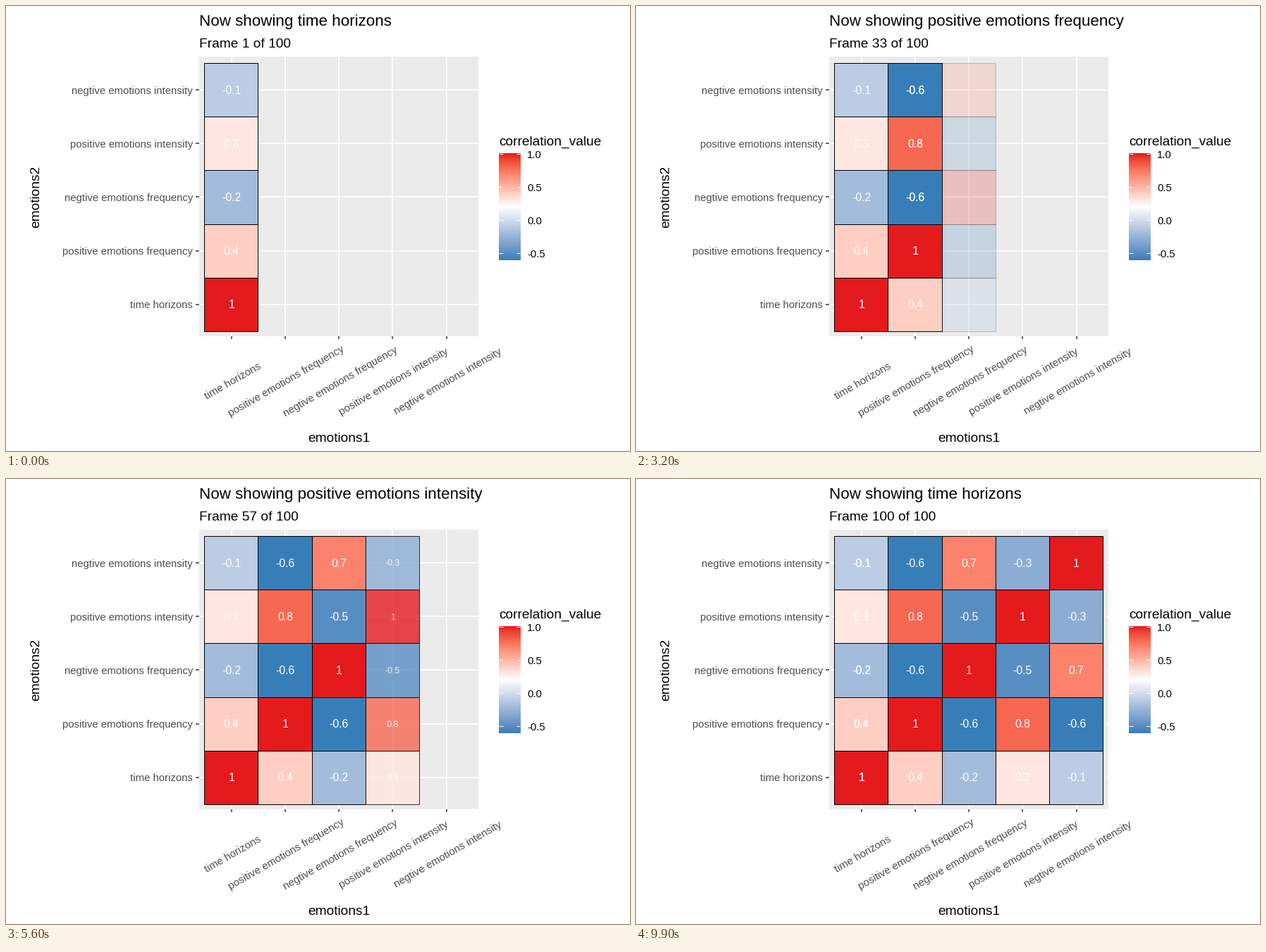
These frames come from a looping animation (885x632 px, 10 s). A matplotlib script:

```python
import numpy as np
import matplotlib.pyplot as plt
from matplotlib.animation import FuncAnimation
from matplotlib.patches import Rectangle

W, H, DPI = 885, 632, 100
FRAMES, INTERVAL = 100, 100
PX = 72 / DPI  # points per pixel

plt.rcParams["font.family"] = "Liberation Sans"

NAMES = ["time horizons", "positive emotions frequency",
         "negtive emotions frequency", "positive emotions intensity",
         "negtive emotions intensity"]
CORR = np.array([[1, .4, -.2, .3, -.1],
                 [.4, 1, -.6, .8, -.6],
                 [-.2, -.6, 1, -.5, .7],
                 [.3, .8, -.5, 1, -.3],
                 [-.1, -.6, .7, -.3, 1]])
N = len(NAMES)

# Tile corners sit half a pixel out so that borders snap to whole pixels.
LEFT, BOTTOM, CELL = 281.2, 462, 76.2
PANEL = (274, 72, 396.4, 396.8)
STARTS = [9, 30, 50, 70, 90]  # last still frame before each transition
LENGTH = 10
CELL_TEXT, TICK_TEXT, AXIS_TEXT, TITLE_TEXT = 15.7, 14.9, 19.2, 22.35

# --- diverging colour scale, interpolated in CIE Lab ---
TO_XYZ = np.array([[.4124564, .3575761, .1804375],
                   [.2126729, .7151522, .0721750],
                   [.0193339, .1191920, .9503041]])
WHITE = TO_XYZ.sum(axis=1)


def to_lab(hex_color):
    c = np.array([int(hex_color[i:i + 2], 16) for i in (1, 3, 5)]) / 255
    lin = np.where(c > .04045, ((c + .055) / 1.055) ** 2.4, c / 12.92)
    xyz = TO_XYZ @ lin / WHITE
    f = np.where(xyz > .008856, np.cbrt(xyz), 7.787 * xyz + 16 / 116)
    return np.array([116 * f[1] - 16, 500 * (f[0] - f[1]), 200 * (f[1] - f[2])])


def to_rgb(lab):
    fy = (lab[0] + 16) / 116
    f = np.array([fy + lab[1] / 500, fy, fy - lab[2] / 200])
    xyz = np.where(f > .206893, f ** 3, (f - 16 / 116) / 7.787) * WHITE
    lin = np.clip(np.linalg.solve(TO_XYZ, xyz), 0, 1)
    return np.where(lin > .0031308, 1.055 * lin ** (1 / 2.4) - .055, 12.92 * lin)


LOW, MID, HIGH = to_lab("#377EB8"), to_lab("#FFFFFF"), to_lab("#E41A1C")


def shade(value):
    t = (value - .2) / .8
    end = HIGH if t > 0 else LOW
    return tuple(np.clip(to_rgb(MID + abs(t) * (end - MID)), 0, 1))


# --- stage ---
fig = plt.figure(figsize=(W / DPI, H / DPI), dpi=DPI, facecolor="white")
ax = fig.add_axes([0, 0, 1, 1])
ax.axis("off")


def label(x, y, s, size, color="black", **kw):
    kw.setdefault("va", "baseline")
    return ax.text(x, y, s, fontsize=size * PX, color=color, **kw)


def line(x0, y0, x1, y1, color, width, z):
    ax.plot([x0, x1], [y0, y1], color=color, lw=width * PX, zorder=z,
            solid_capstyle="butt")


def center_x(col):
    return LEFT + .4 + CELL * (col + .5)


def center_y(row):
    return BOTTOM - .1 - CELL * (row + .5)


def draw_axes():
    x, y, w, h = PANEL
    ax.add_patch(Rectangle((x, y), w, h, fc="#EBEBEB", ec="none", zorder=0))
    for i, name in enumerate(NAMES):
        cx, cy = center_x(i), center_y(i)
        line(cx, y, cx, y + h, "white", 1.8, 1)
        line(x, cy, x + w, cy, "white", 1.8, 1)
        line(cx, y + h, cx, y + h + 4.6, "#333333", 1.5, 1)
        line(x - 4.8, cy, x, cy, "#333333", 1.5, 1)
        label(265, cy + 5.6, name, TICK_TEXT, "#4D4D4D", ha="right")
        label(cx + 2, 533.5, name, TICK_TEXT + .2, "#4D4D4D", rotation=30,
              ha="center", va="center")
    label(472, 619, "emotions1", AXIS_TEXT, ha="center")
    label(47, 270.7, "emotions2", AXIS_TEXT, ha="center", rotation=90,
          rotation_mode="anchor")


def draw_legend():
    x0, x1, y0, y1 = 699, 730, 209, 361
    label(699.5, 197.5, "correlation_value", AXIS_TEXT)
    ramp = np.array([[shade(v)] for v in np.linspace(1, -.6, y1 - y0)])
    ax.imshow(ramp, extent=(x0, x1, y1, y0), aspect="auto",
              interpolation="nearest", zorder=1)
    for v in (1, .5, 0, -.5):
        y = y0 + .5 + (1 - v) * (y1 - y0 - 1) / 1.6
        line(x0, y, x0 + 6, y, "white", 1, 2)
        line(x1 - 6, y, x1, y, "white", 1, 2)
        label(739, y + 6, f"{v:.1f}", TICK_TEXT)


class Column:
    """One stack of tiles with their numbers."""

    def __init__(self, col, z):
        self.colors = [shade(v) for v in CORR[col]]
        self.tiles, self.texts = [], []
        for row, v in enumerate(CORR[col]):
            tile = Rectangle((LEFT + CELL * col, BOTTOM - CELL * (row + 1)),
                             CELL, CELL, lw=PX, zorder=z)
            self.tiles.append(ax.add_patch(tile))
            self.texts.append(label(center_x(col), 0, f"{v:g}", CELL_TEXT,
                                    "white", ha="center", zorder=10 + z))

    def show(self, p, size=None, tiles=True):
        size = p if size is None else size
        for row, (tile, text) in enumerate(zip(self.tiles, self.texts)):
            tile.set_visible(tiles and p > 0)
            tile.set_facecolor((*self.colors[row], p))
            tile.set_edgecolor((0, 0, 0, p))
            text.set_visible(p > 0)
            text.set_alpha(p)
            text.set_fontsize(max(CELL_TEXT * size, 1) * PX)
            text.set_y(center_y(row) + 5.6 * size)


draw_axes()
draw_legend()
ax.set_xlim(0, W)
ax.set_ylim(H, 0)
title = label(274, 28, "", TITLE_TEXT)
subtitle = label(274, 59, "", AXIS_TEXT)
columns = [Column(i, 3 + .1 * i) for i in range(N)]
returning = Column(0, 4)
leaving = [Column(i, 5) for i in range(N)]


def ease(t):
    return (1 - np.cos(np.pi * t)) / 2


def update(i):
    n = i + 1
    times = [min(max((n - s) / LENGTH, 0), 1) for s in STARTS]
    state = sum(t > .5 for t in times) % N
    title.set_text(f"Now showing {NAMES[state]}")
    subtitle.set_text(f"Frame {n} of {FRAMES}")
    columns[0].show(1)
    for col, t in zip(columns[1:] + [returning], times):
        col.show(ease(t))
    for col, t in zip(leaving, times):
        col.show(1 - ease(t) if 0 < t < 1 else 0, size=1, tiles=False)
    return []


anim = FuncAnimation(fig, update, frames=FRAMES, interval=INTERVAL,
                     repeat=True, repeat_delay=0, init_func=lambda: update(0))
plt.show()
```
